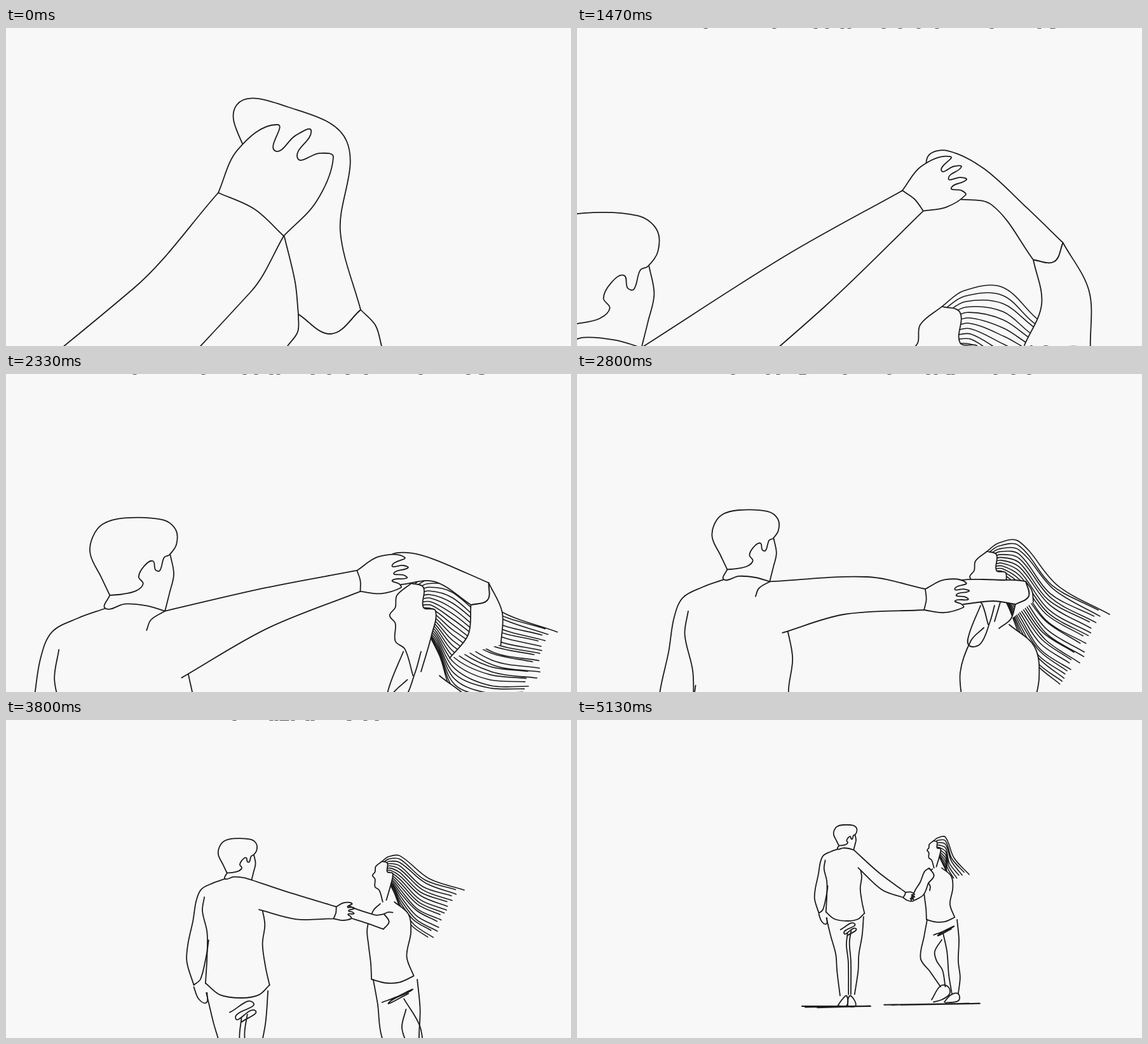
An HTML page that plays this animation: 889 by 500 pixels, repeating every 5270 ms.

```html
<!DOCTYPE html>
<html lang="en">
<head>
<meta charset="utf-8">
<title>Walking together</title>
<style>
html, body { margin: 0; width: 100%; height: 100%; overflow: hidden; background: #f8f8f8; }
svg { display: block; width: 100%; height: 100%; }
path { stroke: #1c1c1c; stroke-linecap: round; stroke-linejoin: round; }
</style>
</head>
<body>
<svg id="stage" viewBox="0 0 889 500" preserveAspectRatio="none"></svg>
<script>
const LOOP = 5270, FPS = 0.015, LAST = 77, PAPER = '#f8f8f8';
const svg = document.getElementById('stage');

const mix = (a, b, u) => a + (b - a) * u;
const mixPoint = (a, b, u) => [mix(a[0], b[0], u), mix(a[1], b[1], u)];
const clamp = v => Math.max(0, Math.min(1, v));
const random = seed => { const v = Math.sin(seed * 127.1 + 3) * 43758.5; return v - Math.floor(v); };
const parse = text => text.trim().split(/\s+/).map(s => s.split(',').map(Number));
// Middle of a-b pushed sideways by k times the distance.
const bend = (a, b, k) => [(a[0] + b[0]) / 2 - k * (b[1] - a[1]), (a[1] + b[1]) / 2 + k * (b[0] - a[0])];

// Joints in stage pixels; "man" and "woman" are the origins of the body shapes.
const joints = 'man woman armTop cuffA cuffB armLow tipA tipB thumb crest knuckle outer inner palm sleeveL sleeveR endL endR hairTop hairLow'.split(' ');
const key = (step, manZoom, womanZoom, text) => {
  const points = parse(text);
  return { step, manZoom, womanZoom, at: Object.fromEntries(joints.map((name, i) => [name, points[i]])) };
};
const keys = [
  key(0, 380, 400, '-586,520 430,720 200,410 334,259 437,327 385,415 427,152 515,203 363,121 443,124 536,178 526,320 455,400 438,328 460,450 558,443 443,500 591,500 700,800 650,950'),
  key(15, 230, 230, '-86,350 510,500 300,360 460,231 516,262 378,453 523,154 583,217 484,157 520,143 600,182 650,265 605,262 550,236 650,365 703,345 668,500 765,500 700,560 680,680'),
  key(29, 173, 155, '130,240 630,384 355,355 557,277 570,310 400,425 643,244 636,302 614,237 640,237 675,255 760,300 695,293 637,297 777,364 818,331 735,498 845,500 900,436 880,540'),
  key(42, 106, 100, '265,214 645,279 457,319 548,338 546,371 420,378 612,328 608,367 606,324 640,323 670,324 690,324 655,357 608,362 690,362 706,326 664,400 718,358 838,378 768,497'),
  key(49, 82, 68, '322,203 614,244 422,305 526,321 520,346 440,347 565,316 566,345 563,314 575,317 600,325 610,328 600,348 562,343 635,362 625,324 605,366 640,322 777,300 703,407'),
  key(65, 46, 46, '396,174 575,206 460,245 515,273 512,287 470,288 529,268 526,288 527,278 535,283 550,288 562,291 543,298 525,287 563,304 572,291 582,289 585,288 679,243 645,303'),
  key(77, 37, 37, '422,165 561,190 475,240 517,271 513,279 480,267 531,274 526,285 529,273 533,266 540,255 547,238 545,275 528,285 553,256 554,233 555,268 556,236 617,243 572,265')
];

// Body shapes in head sizes, measured from the figure's origin.
const shapes = texts => Object.fromEntries(Object.entries(texts).map(([name, text]) => [name, parse(text)]));
const man = shapes({
  head: '-.27,.88 -.37,.67 -.49,.42 -.47,.23 -.35,.07 -.1,0 .33,.02 .48,.13 .49,.3 .41,.42 .35,.45 .3,.6 .25,.59 .22,.49 .12,.55 .06,.67 .11,.75 .03,.83 -.14,.87 -.27,.88',
  face: '.42,.42 .46,.64 .41,.86 .36,1.06',
  collar: '-.27,.88 -.32,1.03 -.1,.98 .15,1 .36,1.06',
  shoulder: '-.32,1.03 -.63,1.14 -.93,1.3 -1.06,1.6 -1.14,2.1 -1.27,2.7 -1.3,3.15 -1.12,3.75',
  innerArm: '-.74,2.6 -.8,3 -.95,3.6 -1.12,3.75',
  left: '-.85,1.5 -.9,1.85 -.78,2.4 -.78,3 -.82,3.7',
  right: '.62,1.75 .7,2.2 .64,2.7 .72,3.3 .82,3.75',
  hem: '-.82,3.7 -.45,4 .1,4.08 .55,4 .82,3.75',
  hand: '-1.12,3.8 -1,4.1 -.8,4.2 -.78,3.95',
  outerLeg: '-.8,3.95 -.62,4.7 -.4,5.5 -.35,6.2 -.22,7.25',
  otherLeg: '.78,3.9 .72,4.7 .58,5.5 .55,6.2 .4,7.2',
  inseam: '.1,4.6 .05,5.1 .13,5.8 .14,7.2',
  otherInseam: '.25,4.5 .18,5 .24,5.8 .24,7.2',
  crease: '-.2,4.45 .4,4.2 -.05,4.6 .45,4.4 .1,4.7',
  shoe: '-.3,7.65 -.1,7.38 .07,7.27 .05,7.7 -.3,7.68',
  otherShoe: '.1,7.7 .18,7.27 .38,7.43 .43,7.7 .1,7.7'
});
const woman = shapes({
  face: '.02,1.15 -.08,.82 -.2,.72 -.2,.5 -.27,.4 -.2,.3 -.18,.15 0,0',
  hairline: '0,0 .15,.05 .15,.3 .3,.34 .25,.65 .12,1.1',
  front: '-.05,1.2 -.25,1.4 -.42,1.9 -.38,2.4 -.32,2.9 -.3,3.35',
  back: '.9,3.25 .7,2.7 .82,2 .75,1.5 .35,1.15',
  waist: '-.3,3.35 .1,3.45 .5,3.43 .9,3.25',
  neckline: '-.1,.85 -.28,1.3 -.28,1.48 -.1,1.45 .05,1.1 .12,.85',
  farArm: '-.32,2.66 -.87,3 -1.3,3.18 -1.4,3.32 -1.24,3.4 -.35,3',
  outerLeg: '-.27,3.35 -.4,4.05 -.55,5 -.16,5.54 .3,6.2',
  innerLeg: '.35,4.2 .05,4.7 .13,5.1 .38,5.5 .5,6.2',
  otherLeg: '1,3.35 1.08,4.2 1.05,5.1 1.13,5.8 1.05,6.5',
  inseam: '.4,3.9 .57,4.7 .65,5.7 .78,6.5',
  crease: '0,4 .4,3.85 .85,3.65 .2,4 .75,3.75',
  shoe: '-.08,6.75 .3,6.16 .62,6.2 .68,6.5 .35,6.75 0,6.85',
  otherShoe: '.46,6.85 .73,6.55 1.05,6.5 1.05,6.8 .5,6.88'
});

const text = p => p[0].toFixed(1) + ' ' + p[1].toFixed(1);
// Smooth curve whose handles follow the neighbours' direction.
function curve(pts) {
  const tangent = i => {
    const a = pts[Math.max(0, i - 1)], b = pts[Math.min(pts.length - 1, i + 1)];
    const length = Math.hypot(b[0] - a[0], b[1] - a[1]) || 1;
    return [(b[0] - a[0]) / length, (b[1] - a[1]) / length];
  };
  let d = text(pts[0]);
  for (let i = 1; i < pts.length; i++) {
    const a = pts[i - 1], b = pts[i], s = tangent(i - 1), e = tangent(i);
    const h = Math.hypot(b[0] - a[0], b[1] - a[1]) / 3;
    d += 'C' + [[a[0] + s[0] * h, a[1] + s[1] * h], [b[0] - e[0] * h, b[1] - e[1] * h], b].map(text).join(' ');
  }
  return d;
}
const outline = (...runs) => 'M' + runs.map(curve).join('L');

const pool = [];
let used = 0;
function draw(d, fill = 'none', width = 1.8) {
  const path = pool[used] ||= svg.appendChild(document.createElementNS('http://www.w3.org/2000/svg', 'path'));
  used++;
  path.setAttribute('d', d);
  path.setAttribute('fill', fill);
  path.setAttribute('stroke-width', width);
}

function drawHair(place, j, zoom) {
  const count = Math.round(Math.min(24, zoom * 0.3));
  let d = '';
  for (let i = 0; i < count; i++) {
    const s = i / (count - 1);
    const [root, front, crown] = place([
      mixPoint([0, 0], [0.25, 0.7], s), mixPoint([0.18, -0.13], [0.35, 0.9], s), mixPoint([0.5, -0.16], [0.55, 1.4], s)
    ]);
    const tip = mixPoint(crown, mixPoint(j.hairTop, j.hairLow, s), 1 - 0.14 * random(i) * (i > 0));
    d += outline([root, front, crown, bend(crown, tip, 0.08 + 0.03 * random(i + 50)), tip]);
  }
  draw(d, 'none', 1.6);
}

function drawHand(j, fingers) {
  const wrist = mixPoint(j.cuffA, j.cuffB, 0.5), middle = bend(j.tipA, j.tipB, -0.18);
  const flat = mixPoint(j.tipA, j.tipB, 0.5);
  const tip = i => {
    const u = i / (fingers - 1), p = mixPoint(j.tipA, j.tipB, u), lift = Math.sin(u * Math.PI);
    return [p[0] + (middle[0] - flat[0]) * lift, p[1] + (middle[1] - flat[1]) * lift];
  };
  const pts = [j.cuffA, bend(j.cuffA, j.tipA, -0.15)];
  for (let i = 0; i < fingers; i++) {
    if (i) {
      pts.push(mixPoint(mixPoint(tip(i - 1), tip(i), 0.2), wrist, 0.28));
      pts.push(mixPoint(mixPoint(tip(i - 1), tip(i), 0.65), wrist, 0.08));
    }
    pts.push(tip(i));
  }
  draw(outline([...pts, bend(j.tipB, j.cuffB, -0.1), j.cuffB]), PAPER);
}

function drawGround(place, left, right, y) {
  const pts = Array.from({ length: 7 }, (_, i) => {
    const inset = i ? random(i + left) * 0.9 : 0;
    return [i % 2 ? right - inset : left + inset, y + (random(i * 3 + right) - 0.5) * 0.09];
  });
  draw('M' + place(pts).map(text).join('L'), 'none', 2);
}

function drawWoman(place, j, zoom, pose) {
  const stride = clamp(6 - pose) * 0.55;
  const step = pts => pts.map(([x, y]) => [x + stride * clamp((y - 3.3) / 1.5), y]);
  const line = (...names) => names.forEach(name => draw(outline(place(woman[name]))));
  drawHair(place, j, zoom);
  if (pose > 3.5 && pose < 4.5) line('farArm');
  draw(outline(place(woman.face), place(woman.hairline)), PAPER);
  draw(outline(place(woman.front), place(woman.waist), place(woman.back)), PAPER);
  if (pose < 4) line('neckline');
  line('otherLeg', 'crease', 'otherShoe', 'shoe');
  for (const name of ['outerLeg', 'innerLeg', 'inseam']) draw(outline(place(step(woman[name]))));

  const cuff = [j.sleeveL, bend(j.sleeveL, j.sleeveR, 0.35), j.sleeveR];
  draw(outline([j.endL, bend(j.sleeveL, j.endL, -0.15), j.sleeveL], cuff, [j.sleeveR, bend(j.sleeveR, j.endR, -0.12), j.endR]), PAPER);
  draw(outline([j.palm, j.inner, j.sleeveL], cuff,
    [j.sleeveR, j.outer, j.knuckle, j.crest, j.thumb, mixPoint(j.cuffA, j.tipA, 0.5)]), PAPER);
}

function drawMan(place, j, pose) {
  const line = (...names) => names.forEach(name => draw(outline(place(man[name]))));
  line('shoulder', 'innerArm', 'left', 'right', 'hem', 'hand');
  line('outerLeg', 'otherLeg', 'inseam', 'otherInseam', 'crease', 'shoe', 'otherShoe');
  drawHand(j, pose < 0.5 ? 3 : 4);
  const [neck, armpit] = place([[0.36, 1.06], [0.55, 1.82]]);
  const cuff = [j.cuffA, bend(j.cuffA, j.cuffB, -0.08), j.cuffB];
  draw(outline([neck, j.armTop, j.cuffA], cuff, [j.cuffB, j.armLow, armpit]), PAPER);
  line('face', 'collar', 'head');
  if (pose < 4) draw(outline(place([[0.15, 1.28], [0.2, 1.16], [0.36, 1.06]])));
}

// Lower tips of lettering cut off by the upper edge.
function drawLetterTips(pose) {
  const n = Math.round(pose);
  if (n < 1 || n > 5) return;
  const reach = 420 - n * 55;
  let d = '';
  for (let i = 0; i < 14; i++) d += `M${(490 + (random(n * 20 + i) * 2 - 1) * reach).toFixed()} 0h5`;
  draw(d, 'none', 1.4);
}

function render(ms) {
  const step = Math.min(LAST, Math.floor((ms + 4) * FPS));
  let k = 0;
  while (k < keys.length - 2 && keys[k + 1].step <= step) k++;
  const a = keys[k], b = keys[k + 1];
  const u = (step - a.step) / (b.step - a.step), pose = k + u;
  // The camera pulls back exponentially, so positions follow the zoom.
  const zoom = a.manZoom * (b.manZoom / a.manZoom) ** u;
  const pan = (zoom - a.manZoom) / (b.manZoom - a.manZoom);
  const womanZoom = mix(a.womanZoom, b.womanZoom, pan);
  const j = Object.fromEntries(joints.map(name => [name, mixPoint(a.at[name], b.at[name], pan)]));
  const placer = (origin, size) => pts => pts.map(p => [origin[0] + p[0] * size, origin[1] + p[1] * size]);
  const placeMan = placer(j.man, zoom), placeWoman = placer(j.woman, womanZoom);

  used = 0;
  drawGround(placeMan, -1.84, 1.7, 7.73);
  drawGround(placeWoman, -2.1, 2.35, 6.95);
  drawWoman(placeWoman, j, womanZoom, pose);
  drawMan(placeMan, j, pose);
  drawLetterTips(pose);
  for (let i = used; i < pool.length; i++) pool[i].setAttribute('d', '');
}

const start = performance.now();
function tick() {
  render((performance.now() - start) % LOOP);
  requestAnimationFrame(tick);
}
tick();
</script>
</body>
</html>
```
